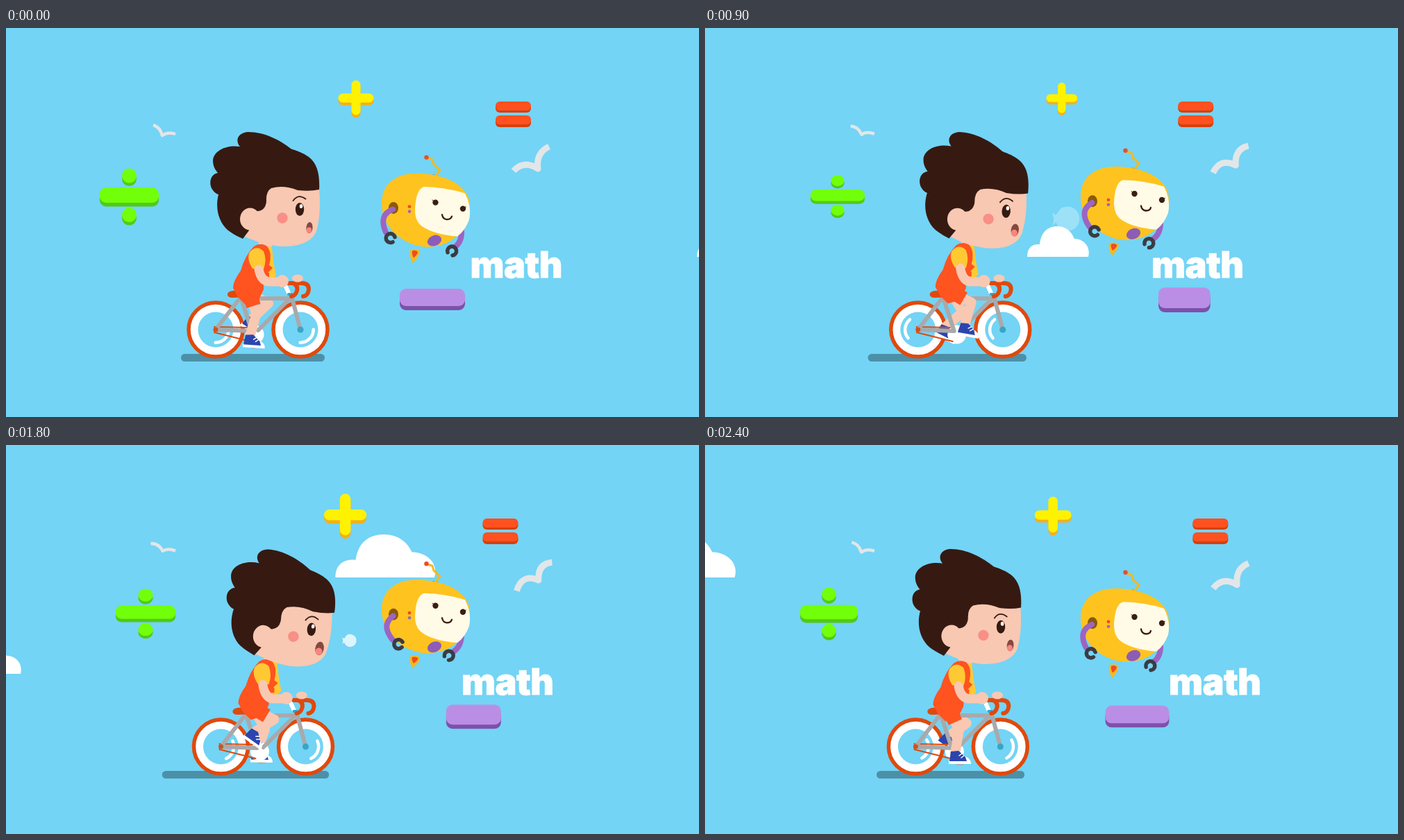
An HTML page for the animation above (2500 ms loop, 998 by 561 pixels).

```html
<!DOCTYPE html>
<html lang="en">
<head>
<meta charset="utf-8">
<title>Math ride</title>
<style>
  html, body { margin: 0; width: 100%; height: 100%; overflow: hidden; background: #73d4f5; }
  svg { display: block; width: 998px; height: 561px; }
  .line { fill: none; stroke-linecap: round; stroke-linejoin: round; }
  .skin { fill: #f8c8b2; }
  .sleg { stroke: #f8c8b2; stroke-width: 14; }
  .metal { stroke: #a9a9ab; stroke-width: 6; }
  .pedal { stroke: #a9a9ab; stroke-width: 3; }
  .bar { stroke: #e0490c; stroke-width: 6; }
  .claw { stroke: #3c3b42; stroke-width: 5.5; }
  .arm { stroke: #9b65c3; stroke-width: 8; }
  .bird { stroke: #e2e6e8; stroke-linecap: butt; }
  .word { font: 900 52px Inter, "Open Sans", sans-serif; letter-spacing: -.6px; fill: #fff; stroke: #fff; stroke-width: .8; }
</style>
</head>
<body>
<svg viewBox="0 0 998 561" xmlns="http://www.w3.org/2000/svg">
  <defs>
    <path id="cloud" fill="#fff" d="M0 44C0 30 8 25 18 26C20 8 30 0 43 0C56 0 64 8 68 18C80 18 92 28 88 44Z"/>
    <g id="wheel">
      <circle r="39" fill="#fff" stroke="#e0490c" stroke-width="5.5"/>
      <circle r="25.5" fill="#73d4f5"/>
    </g>
    <path id="shine" class="line" stroke="#fff" stroke-width="4.5" d="M13 -13.5A19 19 0 0 1 13 13.5"/>
    <g id="shoe">
      <path fill="#fff" d="M-9 15V10L10 3Q23 5 23 15Z"/>
      <path fill="#2c45ad" d="M-6 -3L5 -4L15 5L17 11H-8Z"/>
      <path class="line" stroke="#fff" stroke-width="1.5" d="M6 3L10 0M9 6L13 3"/>
    </g>
  </defs>
  <rect width="998" height="561" fill="#73d4f5"/>

  <use id="cloudA" href="#cloud"/>
  <use id="cloudB" href="#cloud"/>
  <path id="smallBird" class="line bird" stroke-width="4.5"/>
  <path id="bigBird" class="line bird" stroke-width="9"/>

  <g id="divide">
    <g fill="#52c91a">
      <circle cy="-24.5" r="10.5"/><rect x="-42.5" y="-6.5" width="85" height="22" rx="9"/><circle cy="32" r="10.5"/>
    </g>
    <g fill="#72ff0a">
      <circle cy="-29" r="10.5"/><rect x="-42.5" y="-12" width="85" height="22" rx="9"/><circle cy="27.5" r="10.5"/>
    </g>
  </g>
  <g id="plus">
    <path class="line" stroke="#f2b01c" stroke-width="13" d="M0 -16V21M-19 3H19"/>
    <path class="line" stroke="#fff200" stroke-width="13" d="M0 -20V17M-19 -1H19"/>
  </g>
  <g id="equal">
    <g fill="#d3410f"><rect y="108" width="51" height="14" rx="6"/><rect y="129" width="51" height="14" rx="6"/></g>
    <g fill="#ff511f"><rect y="106" width="51" height="13" rx="6"/><rect y="126" width="51" height="13" rx="6"/></g>
  </g>
  <rect id="minusLow" fill="#7d50ab" rx="9"/>
  <rect id="minusTop" fill="#bb8ee6" rx="9"/>
  <text id="word" class="word" y="360">math</text>

  <g id="puff" fill="#fff">
    <path d="M-5 -8.5A10 10 0 1 1 -5 8.5Q-8 6 -9 3L-12 6Q-9.5 0 -12.5 -5L-9 -3Q-7 -6 -5 -8.5Z"/>
  </g>

  <g id="robot">
    <g id="flame">
      <path fill="#f6b91b" d="M-6 0Q0 -3 7 0Q8 6 4 11L-2 19Q-4 14 -6 9Z"/>
      <path fill="#f04b23" d="M-3 1Q1 -1 5 2Q5 6 -1 11Q-4 5 -3 1Z"/>
    </g>
    <g id="armR">
      <path class="line arm" d="M0 0Q1 16 -9 24"/>
      <path class="line claw" d="M-20 32A6.5 6.5 0 1 1 -13 36.4"/>
    </g>
    <ellipse cx="616" cy="214" rx="6" ry="3" fill="#77705f"/>
    <path class="line" stroke="#f6b91b" stroke-width="3" d="M607 187L614 189L616 196L625 204L618 213"/>
    <circle cx="605.5" cy="186" r="3.2" fill="#f04b23"/>
    <path fill="#ffc31f" d="M541 252C541 224 562 209 592 209C628 210 657 222 666 244C671 262 667 280 655 293C645 306 628 316 602 315C568 311 541 285 541 252Z"/>
    <path fill="#fffbe6" d="M602 228.5Q633 229 661 238Q671 257 667 276Q661 292 650 300Q616 297 600 286Q589 279 589 262Q590 232 602 228.5Z"/>
    <g id="smile">
      <g fill="#3a1d14"><circle cx="618.5" cy="251" r="4.2"/><circle cx="658" cy="260" r="4.2"/></g>
      <path class="line" stroke="#3a1d14" stroke-width="1" d="M615.5 248.5L614 247.5M661 258L662.5 257.2"/>
      <path class="line" stroke="#3a1d14" stroke-width="2.3" d="M628 268.5Q629 275 635 275.500Q641 275.500 642 271"/>
    </g>
    <circle cx="581" cy="257" r="2.4" fill="#f04b23"/>
    <circle cx="581" cy="264" r="2.3" fill="#9b65c3"/>
    <ellipse cx="617" cy="306" rx="10.5" ry="7.5" transform="rotate(-22 617 306)" fill="#8c5cb8"/>
    <ellipse cx="558" cy="259" rx="7" ry="8.5" fill="#8a5a0a"/>
    <g id="armL">
      <path class="line arm" d="M-1 2Q-22 10 -11 35"/>
      <path class="line claw" d="M-1 49A6.5 6.5 0 1 1 2 42"/>
    </g>
  </g>

  <rect id="shadow" y="470" height="11" rx="5.5" fill="#4c90a8"/>
  <g id="bike">
    <use href="#wheel" x="302" y="435"/>
    <use href="#wheel" x="424" y="435"/>
    <use id="shineA" href="#shine"/>
    <use id="shineB" href="#shine"/>
    <path id="backPedal" class="line pedal"/>
    <path id="backLeg" class="line sleg"/>
    <use id="backShoe" href="#shoe"/>
    <circle cx="358" cy="442" r="13.5" fill="#fff"/>
    <path class="line" stroke="#e0490c" stroke-width="2" d="M300 431L348 432M300 439L352 452"/>
    <path class="line metal" d="M338 388L302 435L354 437ZM343 390H409L363 436M411 386L424 435"/>
    <circle cx="302" cy="435" r="3.5" fill="#d0521e"/>
    <circle cx="424" cy="435" r="4.5" fill="#38a5c4"/>
    <path class="line" stroke="#fff" stroke-width="6" d="M403 373L407 382"/>
    <path class="line" stroke="#2da9cd" stroke-width="4" d="M407 384H411"/>
    <path fill="#e0490c" d="M319 383Q322 378 333 379L344 378V388L327 389Q318 389 319 383Z"/>
    <path id="frontPedal" class="line pedal"/>
    <path id="frontLeg" class="line sleg"/>
    <use id="frontShoe" href="#shoe"/>
    <path id="thigh" class="line" stroke="#ff5320" stroke-width="21" style="stroke-linecap:butt"/>
    <g id="torso">
      <path class="skin" d="M362 300H384L382 322L366 322Z"/>
      <path fill="#ffc933" d="M364 313L383 316Q385 340 389 357L376 371L355 365Z"/>
      <path fill="#ff5320" d="M357 315Q344 328 338 350Q327 365 327 375L334 388L345 399L363 394L371 377Q370 364 378 352L384 346L379 342Q384 323 375 314Q366 309 357 315Z"/>
      <rect x="372" y="353" width="7" height="7" fill="#ff5320"/>
      <path fill="#ffc933" d="M351 323Q361 312 371 322Q376 334 371 348L355 347Q346 333 351 323Z"/>
    </g>
    <path class="line bar" d="M407 368H426Q436 368 436 377Q435 386 428 387M413 368Q421 371 419 379Q417 386 411 387"/>
    <g id="hands">
      <ellipse class="skin" cx="420" cy="361" rx="8" ry="5.5"/>
      <path id="forearm" class="line" stroke="#f8c8b2" stroke-width="13"/>
      <circle class="skin" cx="398" cy="365" r="9"/>
    </g>
  </g>

  <g id="head">
    <path id="skull" class="skin" d="M365 222H446L451 232C453 255 452 276 447 293C440 310 418 316 395 315C370 312 355 306 343 300L342 260Z"/>
    <path fill="#361a12" d="M451 233C452 213 449 196 436 186C428 180 419 177 411 174.5C394 161 370 149 347 150C333 152 330 163 337 171C319 168 299 176 298 191C298 199 301 204 305 209C295 211 292 222 296 231C299 236 302 239 306 240C301 260 306 280 320 292C328 298 335 301 341 304L350 292L345 265L364 264Q374 262 375 250Q374 236 382 231Q400 226 420 234Q438 236 451 233Z"/>
    <ellipse class="skin" cx="351.5" cy="275.5" rx="14.5" ry="16"/>
    <g id="face">
      <circle cx="398" cy="274" r="7.7" fill="#f98f86"/>
      <ellipse cx="423" cy="261.5" rx="6.2" ry="9.5" fill="#361a12"/>
      <ellipse cx="425" cy="257" rx="2.3" ry="3" fill="#fff"/>
      <path class="line" stroke="#361a12" stroke-width="1.8" d="M413.5 249Q421 238.500 431.5 246.500"/>
      <g id="mouth">
        <ellipse rx="4.6" ry="8" fill="#85493f"/>
        <ellipse cx="-.3" cy="3.5" rx="3.7" ry="4.2" fill="#f9857f"/>
      </g>
    </g>
  </g>
</svg>
<script>
const LOOP = 2500, STEP = 100;
const el = {};
document.querySelectorAll("svg [id]").forEach(n => el[n.id] = n);
const set = (id, attrs) => { for (const k in attrs) el[id].setAttribute(k, attrs[k]); };
const move = (id, transform) => set(id, { transform });
const mix = (a, b, u) => a + (b - a) * u;
const tri = p => 2 * Math.min(p, 1 - p);

// Piecewise linear track: pairs of position and value.
function track(pts, x) {
  let i = 1;
  while (i < pts.length - 1 && pts[i][0] < x) i++;
  const [a, va] = pts[i - 1], [b, vb] = pts[i];
  return mix(va, vb, (x - a) / (b - a));
}

const wordX = [[0, 671.5], [500, 659], [900, 646], [1100, 642], [1300, 647], [1800, 659], [2200, 668], [2400, 671], [2500, 671.5]];
const spin = [[0, 45], [500, 365], [900, 545], [1300, 795], [1800, 1100], [2200, 1280], [2400, 1455], [2500, 1485]];
const divX = [[0, 177.5], [.04, 178], [.4, 199], [.5, 204], [.72, 191], [.76, 188], [.92, 178.5], [1, 177.5]];
const divW = [[0, 85], [.44, 86], [.72, 78], [.76, 76], [.92, 83], [1, 85]];
const divH = [[0, 28.5], [.04, 30], [.2, 30], [.4, 27], [.44, 25], [.72, 21.5], [.76, 21.5], [.92, 26.5], [1, 28.5]];

// Two-bone leg from hip to pedal, with the knee bent forward; returns the hem of the shorts.
function pedal(side, deg, cx, cy, r) {
  const a = deg * Math.PI / 180, hx = 350, hy = 382, thigh = 32, shin = 35;
  const px = cx + r * Math.cos(a), py = cy + r * Math.sin(a);
  const x = px - 7, y = py - 8, dx = x - hx, dy = y - hy;
  const d = Math.min(Math.hypot(dx, dy), thigh + shin - .01);
  const along = (thigh * thigh - shin * shin + d * d) / (2 * d);
  const out = Math.sqrt(Math.max(0, thigh * thigh - along * along));
  const kx = hx + (dx * along + dy * out) / d, ky = hy + (dy * along - dx * out) / d;
  const tilt = 18 - 18 * Math.cos(a - Math.PI / 3);
  set(side + "Pedal", { d: `M${px - 4} ${py + 7}h8` });
  set(side + "Leg", { d: `M${hx} ${hy}L${kx} ${ky}L${x} ${y}` });
  move(side + "Shoe", `translate(${x} ${y}) rotate(${tilt})`);
  return [mix(hx, kx, .62), mix(hy, ky, .62)];
}

function scenery(t, p, u) {
  const slow = tri(t / LOOP);
  const sway = 1 - 2 * tri((t / LOOP + .75) % 1);
  const swing = -sway * (t < 0 ? 1 : -1);
  move("cloudA", `translate(${995 - .59 * t} 286)`);
  move("cloudB", `translate(${2197 - .957 * t} 129) scale(1.62 1.41)`);
  move("plus", `translate(${504 + 17.5 * swing} 102) scale(${1 - .225 * swing})`);
  move("equal", `translate(${705 - 33 * slow} 0)`);
  set("word", { x: track(wordX, t) - 3 });

  const w = 94 - 27 * slow, x = 614 + 106 * slow - w / 2, y = 376 - 2.5 * slow, h = 25 + 6.5 * slow;
  set("minusLow", { x, y: y + 6, width: w, height: h });
  set("minusTop", { x, y, width: w, height: h });
  move("divide", `translate(${track(divX, p)} 242) scale(${track(divW, p) / 85} ${track(divH, p) / 28.5})`);

  const m = (a, b) => mix(a, b, u);
  set("smallBird", { d: `M${m(212, 208)} ${m(140, 142.5)}Q${m(222, 219)} ${m(143, 141)} ${m(225, 226)} ${m(155, 152.5)}Q233 ${m(149, 148)} 244 ${m(153, 152.5)}` });
  set("bigBird", { d: `M${m(731, 734)} ${m(206, 211)}Q${m(746, 741)} ${m(190, 184)} ${m(766, 765)} ${m(203, 194)}Q${m(763, 764)} ${m(180, 170)} ${m(782, 785)} ${m(171, 169)}` });
  move("bigBird", `translate(${-2 * swing} 0)`);
}

function robot(u) {
  move("robot", `translate(0 ${.6 - 17.5 * u})`);
  move("smile", `translate(0 ${-5 * u})`);
  move("armL", `translate(558 259) rotate(${-17.5 * u})`);
  move("armR", `translate(656 291) rotate(${10 * u})`);
  move("flame", `translate(588 320) scale(${1 + .1 * u} ${1 - .13 * u})`);
}

function rider(t, p, u) {
  const turn = track(spin, t), deg = 98 + 360 * p;
  set("shadow", { x: 252 - 31 * u, width: 207 + 38 * u });
  move("bike", `translate(${8.5 * u} 0)`);
  move("shineA", `translate(302 435) rotate(${turn})`);
  move("shineB", `translate(424 435) rotate(${turn})`);
  pedal("back", deg + 180, 358, 440, 11);
  const [hemX, hemY] = pedal("front", deg, 360, 438, 16);
  set("thigh", { d: `M350 380L${hemX} ${hemY}` });
  move("torso", `translate(0 ${-3 * u})`);
  move("hands", `translate(${-2 * u} 0)`);
  set("forearm", { d: `M364 ${348 - 3 * u}Q367 364 378 366L398 366` });
  move("head", `translate(${18 * u} ${2 * u}) rotate(${5.5 * u} 370 310)`);
  move("skull", `translate(${-4 * u} 0)`);
  move("face", `translate(${-3.5 * u} ${-2 * u})`);
  move("mouth", `translate(437 288) rotate(5) scale(${1 + .4 * u} ${1 + .25 * u})`);
}

function puff(p) {
  const q = p - .4;
  set("puff", { opacity: q < -.08 ? 0 : Math.max(0, .82 - 1.65 * q) });
  move("puff", `translate(${491.5 + 93 * q} ${283 - 25 * q}) scale(${Math.max(.3, .8 + 3 * q)})`);
}

function draw(now) {
  const t = Math.floor(now % LOOP / STEP) * STEP;
  const p = t / 1250 % 1, u = tri(p);
  scenery(t, p, u);
  robot(u);
  rider(t, p, u);
  puff(p);
}

const start = performance.now();
function tick() {
  draw(performance.now() - start);
  requestAnimationFrame(tick);
}
tick();
</script>
</body>
</html>
```
